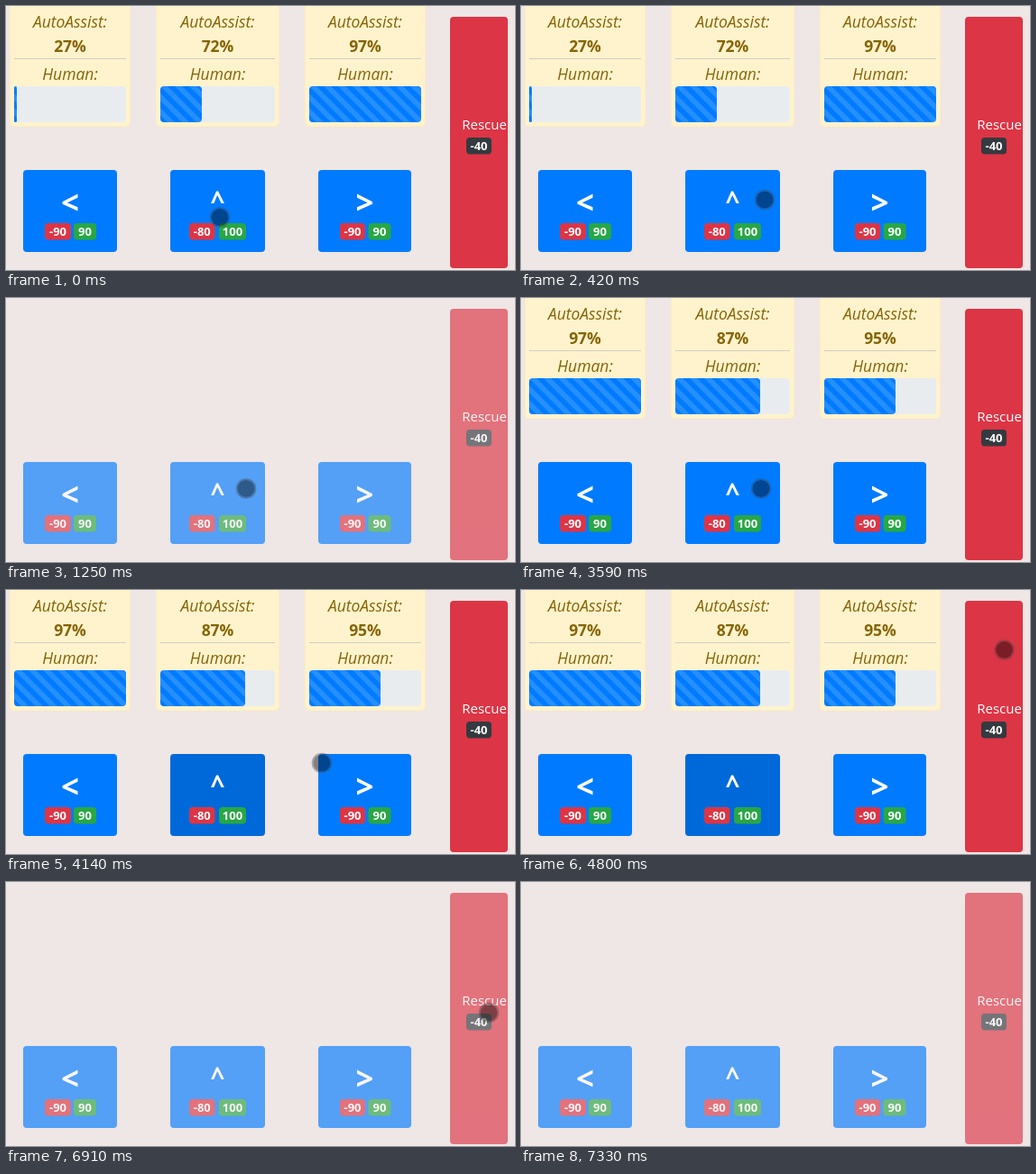
Write an HTML page that moves like this. It is 564 px wide and 293 px high and loops after 7480 ms.

```html
<!DOCTYPE html>
<html lang="en">
<head>
<meta charset="utf-8">
<title>Assist panel</title>
<style>
  html, body { margin: 0; width: 100%; height: 100%; overflow: hidden; background: #efe6e6; }
  svg { display: block; width: 564px; height: 293px; font-family: "Open Sans", "Noto Sans", sans-serif; }
  text { text-anchor: middle; fill: #fff; }
  .card text { fill: #856404; font-size: 17.5px; }
  .label { font-style: italic; }
  .value, .badge, .sign { font-weight: 700; }
  .badge { font-size: 13px; }
</style>
</head>
<body>
<svg viewBox="0 0 564 293">
  <defs>
    <pattern id="stripes" y="89" width="16" height="16" patternUnits="userSpaceOnUse">
      <path d="M0 0H8L16 8V16ZM0 8L8 16H0Z" fill="#fff" fill-opacity=".15"/>
    </pattern>
  </defs>
  <g id="cards"></g>
  <g id="buttons"></g>
  <g id="cursor">
    <circle r="9.5" fill="#000" fill-opacity=".44"/>
    <circle r="10.4" fill="none" stroke="#444" stroke-opacity=".4" stroke-width="1.8"/>
  </g>
</svg>
<script>
const LOOP = 7480;
const RED = '#dc3545', GREEN = '#28a745', BLUE = '#007bff', BLUE_PRESSED = '#0069d9';
const byId = id => document.getElementById(id);

function add(parent, tag, attrs, text) {
  const node = document.createElementNS('http://www.w3.org/2000/svg', tag);
  for (const key in attrs) node.setAttribute(key, attrs[key]);
  if (text) node.textContent = text;
  return parent.appendChild(node);
}

function box(parent, x, y, width, height, fill, rx = 4) {
  return add(parent, 'rect', { x, y, width, height, rx, fill });
}

function badge(parent, x, y, width, fill, text) {
  box(parent, x, y, width, 18.5, fill);
  add(parent, 'text', { x: x + width / 2, y: y + 14, class: 'badge' }, text);
}

function makeCard(left, trackWidth) {
  const card = add(byId('cards'), 'g', { class: 'card', transform: `translate(${left})` });
  const center = trackWidth / 2;
  add(card, 'rect', { x: -4.5, y: -10, width: trackWidth + 9, height: 143.5, rx: 4, fill: '#fff3cd', stroke: '#ffeeba' });
  add(card, 'text', { x: center, y: 24, class: 'label' }, 'AutoAssist:');
  const value = add(card, 'text', { x: center, y: 51, class: 'value' });
  add(card, 'rect', { y: 58, width: trackWidth, height: 1, fill: '#d0cdc0' });
  add(card, 'text', { x: center, y: 82, class: 'label' }, 'Human:');
  box(card, 0, 89, trackWidth, 40, '#e9ecef');
  const bars = [BLUE, 'url(#stripes)'].map(fill => box(card, 0, 89, 0, 40, fill));
  return (percent, barWidth) => {
    value.textContent = percent + '%';
    for (const bar of bars) {
      bar.setAttribute('width', barWidth);
      bar.setAttribute('rx', Math.min(4, barWidth / 2));
    }
  };
}

function makeButton(x, width, sign, size, baseline, badges) {
  const group = add(byId('buttons'), 'g', {});
  const face = box(group, x, 182, width, 91, BLUE);
  add(group, 'text', { x: x + width / 2, y: baseline, class: 'sign', 'font-size': size }, sign);
  badges.forEach(args => badge(group, ...args));
  return face;
}

const cards = [makeCard(9, 124), makeCard(171, 127), makeCard(336, 124)];

makeButton(19, 104, '<', 35, 231, [[43, 241, 29, RED, '-90'], [75, 241, 25, GREEN, '90']]);
const upFace = makeButton(182, 105, '^', 28, 226, [[203, 241, 28.5, RED, '-80'], [236, 241, 30, GREEN, '100']]);
makeButton(346, 103, '>', 35, 231, [[370, 241, 28, RED, '-90'], [401.5, 241, 25, GREEN, '90']]);

const rescue = add(byId('buttons'), 'g', {});
box(rescue, 492, 12, 64, 279, RED);
add(rescue, 'text', { x: 530, y: 137, 'font-size': 15 }, 'Rescue');
badge(rescue, 510, 146, 28, '#343a40', '-40');

// [start ms, x, y]; the pointer jumps from place to place
const pointer = [
  [0, 237, 234.5], [120, 238.5, 226.5], [270, 257, 221.5], [420, 270, 215],
  [670, 268.5, 213.5], [820, 266, 211.5], [4140, 350, 192], [4260, 464, 164.5],
  [4410, 510, 135], [4530, 529, 115], [4650, 538.5, 103.5], [4800, 535.5, 66.5],
  [6910, 535, 145], [7030, 529, 232], [7180, 516.5, 280.5]
];
// [percent, bar width] for each card
const rounds = [
  [[27, 3], [72, 46], [97, 124]],
  [[97, 124], [87, 94], [95, 79]]
];
const within = (t, from, to) => t >= from && t < to;

function draw(t) {
  const waiting = within(t, 1250, 3590) || t >= 5330;
  byId('cards').style.display = waiting ? 'none' : '';
  for (const group of byId('buttons').children) group.setAttribute('opacity', waiting ? 0.65 : 1);
  const round = rounds[t < 3590 ? 0 : 1];
  cards.forEach((setCard, i) => setCard(...round[i]));
  upFace.setAttribute('fill', within(t, 3710, 5480) ? BLUE_PRESSED : BLUE);

  const [, x, y] = pointer.filter(step => step[0] <= t).pop();
  byId('cursor').setAttribute('transform', `translate(${x} ${y})`);
  byId('cursor').style.display = t >= 7330 ? 'none' : '';
}

const start = performance.now();
function tick() {
  draw((performance.now() - start) % LOOP);
  requestAnimationFrame(tick);
}
tick();
</script>
</body>
</html>
```
